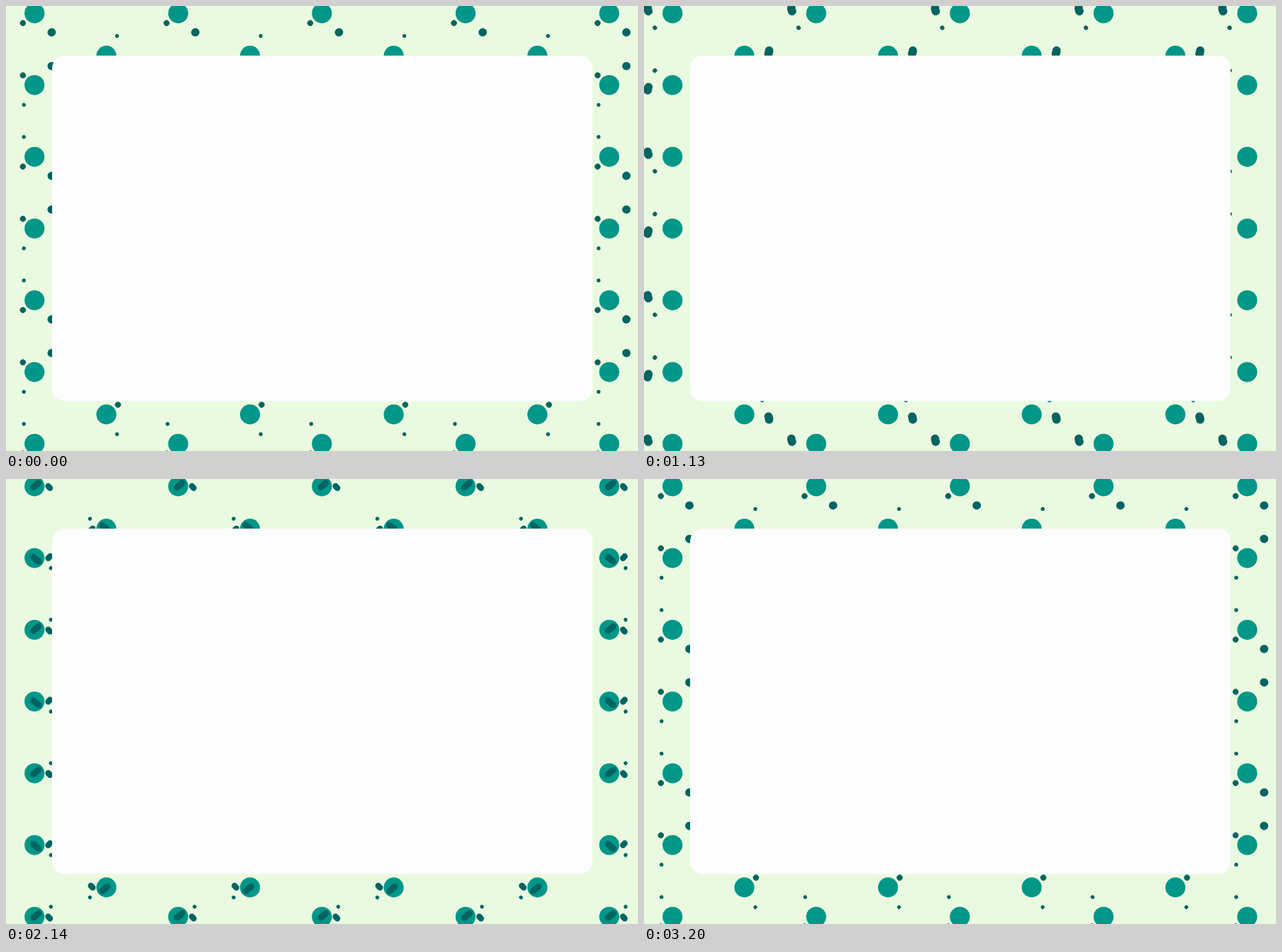
Recreate the animation shown at these times as an HTML page with a canvas. Size 891 by 628 pixels, loop 3230 ms.

```html
<!DOCTYPE html>
<html lang="en">
<head>
<meta charset="utf-8">
<title>Orbiting dots</title>
<style>
  html, body { margin: 0; width: 100%; height: 100%; overflow: hidden; background: #eafae0; }
  canvas { display: block; }
</style>
</head>
<body>
<canvas id="stage" width="891" height="628"></canvas>
<script>
const ctx = document.getElementById("stage").getContext("2d");
const LOOP = 3230;
const STEP = LOOP / 97;
const TURN = 1000 * Math.PI;   // ms per revolution
const TAU = 2 * Math.PI;
const PITCH = 101.25;
const BIG = "#009688", DARK = "#006461", BACK = "#eafae0", PANEL = "#fdfcfe";

const rad = deg => deg * Math.PI / 180;
const polar = (len, deg) => [len * Math.cos(rad(deg)), len * Math.sin(rad(deg))];

// u points to the near side, v across; q is the strength of the perspective
const orbits = [
  { u: polar(16, 121), v: polar(34, 31), q: 0.32, size: 9.9, start: 57, dir: -1, blur: 55 },
  { u: [0, 0], v: polar(21.2, -40), q: 0.16, size: 7.8, start: 285, dir: -1, blur: 120, halo: 190 },
  { u: polar(29.1, 130), v: polar(33.7, 40), q: 0.092, size: 5.5, start: -114.8, dir: 1, blur: 4 }
];

// Share of a revolution: slow around the start, fast in the middle
function progress(time) {
  const t = time / TURN, a = TAU * t;
  return t - 0.105 * Math.sin(a) - 0.015 * Math.sin(2 * a) + 0.009 * (1 - Math.cos(a));
}

function locate(o, time) {
  const a = rad(o.start) + o.dir * TAU * progress(time);
  const c = Math.cos(a), s = Math.sin(a);
  const scale = 1 / (1 - o.q * c);
  return {
    x: scale * (o.u[0] * c + o.v[0] * s),
    y: scale * (o.u[1] * c + o.v[1] * s),
    scale, near: c > 0
  };
}

function disc(x, y, r, fill) {
  ctx.fillStyle = fill;
  ctx.beginPath();
  ctx.arc(x, y, r, 0, TAU);
  ctx.fill();
}

// The path covered during a short exposure, as one round stroke
function streak(o, time, span, alpha) {
  ctx.globalAlpha = alpha;
  ctx.lineWidth = o.size * locate(o, time).scale ** 0.75;
  ctx.beginPath();
  for (let i = -2; i <= 2; i++) {
    const p = locate(o, time + span * i / 4);
    ctx.lineTo(p.x, p.y);
  }
  ctx.stroke();
  ctx.globalAlpha = 1;
}

function drawDots(time, near) {
  for (const o of orbits) {
    if (locate(o, time).near !== near) continue;
    if (o.halo) streak(o, time, o.halo, 0.35);
    streak(o, time, o.blur, 1);
  }
}

function drawCell(x, y, sx, sy, time) {
  ctx.save();
  ctx.translate(x, y);
  ctx.scale(sx, sy);
  drawDots(time, false);
  disc(0, 0, 14.1, BIG);
  drawDots(time, true);
  ctx.restore();
}

function render(time) {
  ctx.fillStyle = BACK;
  ctx.fillRect(0, 0, 891, 628);
  ctx.strokeStyle = DARK;
  ctx.lineCap = ctx.lineJoin = "round";
  for (let col = 0; col < 9; col++) {
    const odd = col % 2;
    const sx = odd ? -1 : 1;
    for (let row = 0; row < 8; row++) {
      const sy = row % 2 ? -sx : sx;
      const x = 40.2 + 101.28 * col;
      const y = (odd ? -31.1 : 10.3) + PITCH * row;
      drawCell(x, y, sx, sy, time);
    }
  }
  ctx.fillStyle = PANEL;
  ctx.beginPath();
  ctx.roundRect(65, 70, 762, 487.5, 18);
  ctx.fill();
}

const begin = performance.now();
function tick() {
  const t = (performance.now() - begin) % LOOP;
  render(Math.floor(t / STEP) * STEP);
  requestAnimationFrame(tick);
}
tick();
</script>
</body>
</html>
```
